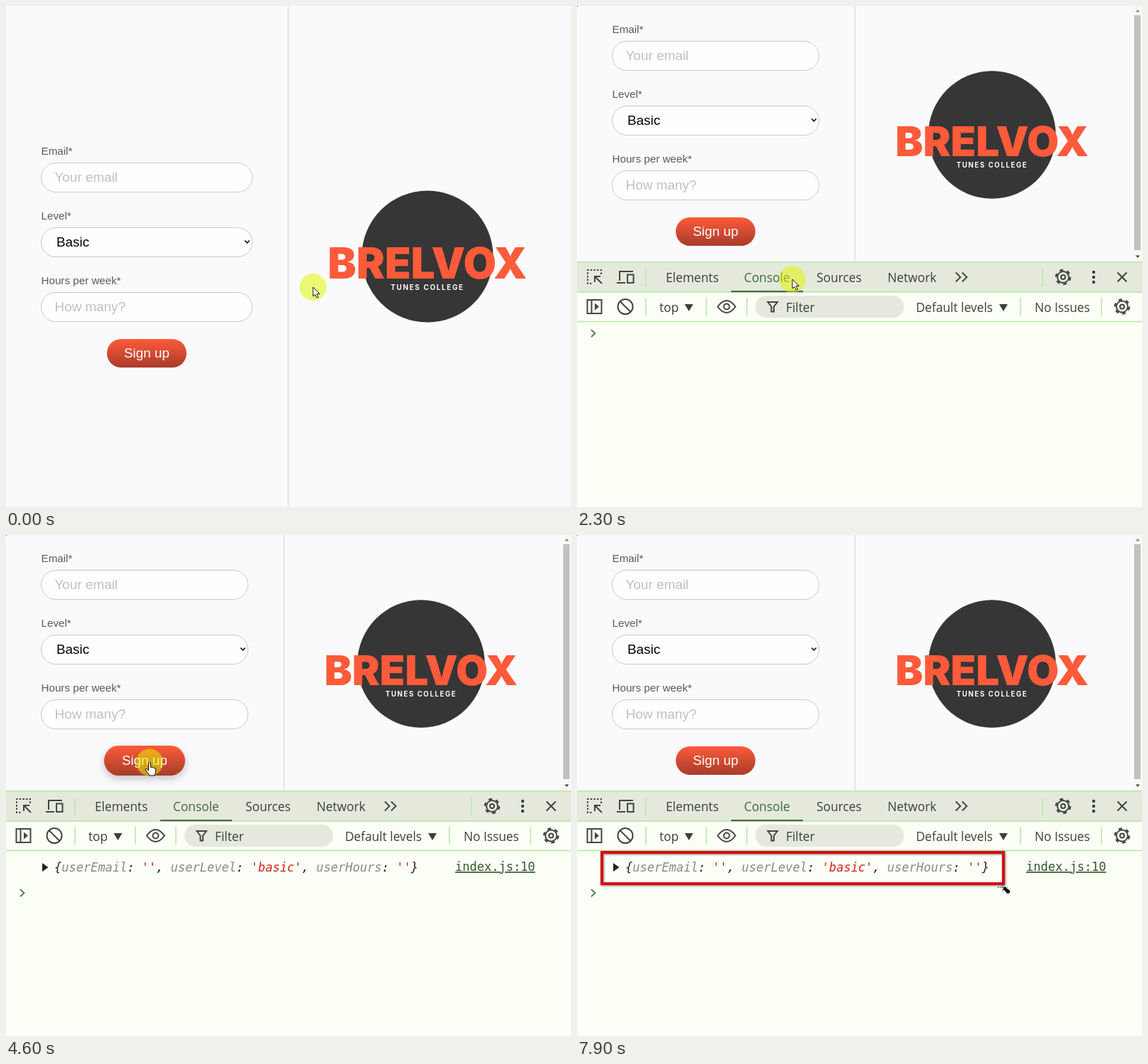
Recreate the animation shown at these times as an HTML page. Size 795 by 704 pixels, loop 8000 ms.

```html
<!DOCTYPE html>
<html lang="en">
<head>
<meta charset="utf-8">
<title>Sign-up form and console</title>
<style>
  html, body { margin: 0; width: 100%; height: 100%; overflow: hidden; background: #fafafc; }
  svg { display: block; }
  text { white-space: pre; }
  .form { font: 18.9px "Liberation Sans", Arial, sans-serif; }
  .label { font-size: 15.2px; fill: #5b5b5e; }
  .hint { fill: #bfbfc3; }
  .field { fill: #fefffd; stroke: #c9c9cb; }
  .brand { font: 900 60px Inter, sans-serif; fill: #ff5a3a; text-anchor: middle; }
  .tagline { font: 700 10px Inter, sans-serif; letter-spacing: 1.6px; fill: #fafafc; text-anchor: middle; }
  .menu { font: 8.8px "Open Sans", "Noto Sans", sans-serif; fill: #1f211e; }
  .menu .box { fill: #fafff5; filter: drop-shadow(0 3px 5px rgba(0, 0, 0, .28)); }
  .end { text-anchor: end; fill: #4c4f4a; }
  .tools { font: 17.3px "Open Sans", "Noto Sans", sans-serif; fill: #3c403b; }
  .icon { fill: none; stroke: #434740; stroke-width: 2; }
  .rule { stroke: #b3e9a5; stroke-width: 1.5; }
  .log { font: italic 17px "DejaVu Sans Mono", monospace; fill: #202220; }
  .key { fill: #878b85; }
  .str { fill: #d5231f; }
  .link { font-style: normal; fill: #35582f; text-decoration: underline; }
</style>
</head>
<body>
<svg id="stage" width="795" height="704" viewBox="0 0 795 704"></svg>
<script>
const LOOP = 8000, STEP = 100, HALO_LAG = 40;
const text = (x, y, s, cls = '', extra = '') => `<text x="${x}" y="${y}" class="${cls}" ${extra}>${s}</text>`;
const rect = (x, y, w, h, extra = '') => `<rect x="${x}" y="${y}" width="${w}" height="${h}" ${extra}/>`;
const path = (d, extra = 'class="icon"') => `<path d="${d}" ${extra}/>`;
const at = (x, y, s) => `<g transform="translate(${x} ${y})">${s}</g>`;
const group = (id, s, cls = '') => `<g id="${id}" class="${cls}">${s}</g>`;

// Sign-up page: shift moves it up, narrow shrinks the left column
function page(id, shift, narrow, logoX, logoY, logoScale) {
  const w = 297 - narrow, mid = 198 - narrow / 2;
  const field = (y, label, value, cls) =>
    text(49.5, y - 11, label, 'label') +
    rect(49.5, y + .5, w, 41, 'rx="20.5" class="field"') +
    text(cls ? 68.5 : 71, y + 26.6, value, cls);
  return group(id, rect(0, 0, 795, 704, 'fill="#fafafc"') +
    `<g transform="translate(0 ${-shift})">` +
    field(220, 'Email*', 'Your email', 'hint') +
    field(311, 'Level*', 'Basic', '') +
    field(402, 'Hours per week*', 'How many?', 'hint') +
    path(`M${336 - narrow} 329.5l3.3 3.3 3.3-3.3`, 'fill="none" stroke="#111" stroke-width="1.7"') +
    `<g class="button">${rect(mid - 56, 468, 112, 40, 'rx="20" fill="url(#red)"')}</g>` +
    text(mid, 494.3, 'Sign up', '', 'fill="#fff" text-anchor="middle"') + '</g>' +
    rect(397 - narrow - .5, 0, 1, 704, 'fill="#d0d0d4"') +
    `<g transform="translate(${logoX} ${logoY}) scale(${logoScale})">` +
    '<circle r="92.5" fill="#363636"/>' +
    text(0, 31, 'BRELVOX', 'brand') + text(0, 47, 'TUNES COLLEGE', 'tagline') + '</g>', 'form');
}

const menuRows = [
  [-3, 'Back', 'Alt+Left Arrow'], [19, 'Forward', 'Alt+Right Arrow'], [41, 'Reload', 'Ctrl+R'],
  [75.5, 'Save as…', 'Ctrl+S'], [97, 'Print…', 'Ctrl+P'], [119, 'Cast…'],
  [142, 'Search with Orbexo Peek'], [165, 'Open in reading mode'],
  [200, 'Send to your devices'], [222.5, 'Create QR Code for this page'], [258, 'Translate to English'],
  [293, 'Lockbarro – Passcode Steward', '>'], [314.5, 'Quillo Pagerat: PDF edit, convert, sign tools', '>'],
  [349.5, 'View page source', 'Ctrl+U'], [371, 'Inspect']
];
const thin = 'fill="none" stroke="#434740" stroke-width="1.3"';
const menu = group('menu',
  rect(420, -60, 311, 451, 'rx="8" class="box"') +
  group('menuHover', rect(420, 361, 311, 21, 'fill="#e5ebdf"')) +
  [57.5, 182, 240, 275, 331.5].map(y => rect(420, y - .5, 311, 1, 'fill="#c6efb8"')).join('') +
  menuRows.map(([y, name, side]) =>
    text(461, y + 3.2, name, '', y < 30 ? 'fill="#777b75"' : '') +
    (side === '>' ? path(`M707 ${y - 3.5}l3.5 3.5-3.5 3.5`, thin) : side ? text(714, y + 3.2, side, 'end') : '')).join('') +
  '<circle cx="444" cy="142" r="5.5" fill="#434740"/>' +
  path('M440 203v-7h9M438 204h6M446 198.5h3.5v5.5h-3.5z', thin) +
  [438.5, 445.5].map(x => [217, 224].map(y => rect(x, y, 4, 4, thin)).join('')).join('') +
  '<circle cx="444" cy="292.5" r="6" fill="#1a73c8"/>' + rect(438, 308, 12, 12, 'rx="1.5" fill="#b30b00"'), 'menu');

const more = x => path(`M${x - 8} 374.5l6.5 6.5-6.5 6.5M${x + 1} 374.5l6.5 6.5-6.5 6.5`);
const bar = (x, y) => path(`M${x} ${y}v25`, 'class="rule"');
const down = x => path(`M${x - 6} 419h12l-6 10z`, 'fill="#3c403b"');
const gear = (x, y) => at(x, y, '<g class="icon"><circle r="8"/><circle r="3"/>' +
  '<circle r="10" stroke-width="2.6" stroke-dasharray="5 5.47"/></g>');

const tabs = [['Elements', 107, 216], ['Console', 217, 318], ['Sources', 319, 418], ['Network', 419, 526]];
const scrollbar = rect(783, 0, 12, 359, 'fill="#f8f8f9"') + rect(784, 13, 9, 330, 'fill="#c1c1c1"') +
  path('M786 8.5h6l-3-3.5z', 'fill="#8a8a8a"') + path('M786 350.5h6l-3 3.5z', 'fill="#444"');

const sideIcons = group('sideIcons',
  path('M34 377v-6h-19v19h7', 'class="icon" stroke-dasharray="2.5 2.2"') +
  path('M25 388v-8h8M25.5 380.5l9.5 9.5') +
  path('M60 386v-13h19M56 389h12M71 377.5h8.5v11.5h-8.5z') +
  bar(97, 369) + bar(655, 369) + more(541) + gear(684, 381) +
  [374, 381, 388].map(y => `<circle cx="727" cy="${y}" r="2.2"/>`).join('') +
  path('M760.5 374.5l13 13M773.5 374.5l-13 13'));

const logLine = group('logLine', path('M51 461v12l8.5-6z', 'fill="#202220"') +
  text(68, 473, '{' + [['userEmail', ''], ['userLevel', 'basic'], ['userHours', '']].map(([k, v]) =>
    `<tspan class="key">${k}</tspan>: <tspan class="str">'${v}'</tspan>`).join(', ') + '}', 'log') +
  text(632, 472, 'index.js:10', 'log link'));

const consolePane = group('console',
  path('M14.5 413h20v19h-20zM20.5 413v19') + path('M25 417.5l6 5-6 5z', 'fill="#434740"') +
  '<circle cx="68" cy="422.5" r="10.5" class="icon"/>' + path('M60.5 415l15 15') +
  path('M198 422.5q12.5-17 25 0q-12.5 17-25 0z') + '<circle cx="210.5" cy="422.5" r="4" class="icon"/>' +
  [97, 182, 239, 624, 738].map(x => bar(x, 410)).join('') +
  rect(251, 407, 209, 31, 'rx="15.5" fill="#e4e9dc"') + path('M268.5 416h13.5l-5 6.5v7h-3.5v-7z') +
  text(116, 429.5, 'top') + down(157.5) + text(294, 429.5, 'Filter') +
  text(477, 429.5, 'Default levels') + down(600) + text(644, 429.5, 'No Issues') + gear(767, 422.5) +
  path('M0 443.5h795', 'class="rule"') + logLine +
  group('prompt', path('M20 455l5.5 5-5.5 5', 'fill="none" stroke="#4d7d45" stroke-width="1.8"')));

const devtools = group('devtools', scrollbar +
  rect(0, 359, 795, 345, 'fill="#fbfff5"') + rect(0, 360, 795, 42, 'fill="#e4e9dc"') +
  group('tabHover', rect(0, 361, 107, 40, 'fill="#d9dfd3"')) +
  path('M0 359.7h795M0 402h795', 'class="rule"') +
  tabs.map(([name, x]) => text(x + 18, 388, name, 'tab')).join('') +
  group('underline', rect(0, 400, 1, 2.2, 'fill="#4a6b45"')) +
  group('loading', text(544, 388, 'Performance') + more(680)) + sideIcons + consolePane, 'tools');

const cursors =
  '<circle id="halo" r="19" fill="rgba(226,246,0,.53)"/>' +
  group('frame', '<rect id="marker" x="35" y="446" fill="none" stroke="#dd0b12" stroke-width="4" ' +
    'style="filter:drop-shadow(1px 1px 1.5px rgba(0,0,0,.5))"/>') +
  group('arrow', path('M0 0v13l3-2.7 2.2 4.8 2.3-1-2.2-4.7h4z', 'fill="#fff" stroke="#111"')) +
  group('hand', path('M-1.5 1q1.5-2 3 0v6q1.5-1 2.7.5 1.500-.8 2.5.7 1.800-.4 2 1.3v4q0 2-1.5 3.5v1.5h-8v-1.5l-5-6.5q-.3-2 1.800-1.3l2.5 2.3z',
    'fill="#fff" stroke="#111"')) +
  group('cross', path('M-7 0h14M0-7v14', 'stroke="#222" stroke-dasharray="2 1.3"') +
    path('M3 2l4 3.5', 'stroke="#111" stroke-width="4.5" stroke-linecap="round"') +
    '<circle cx="7.5" cy="6" r="2.8" fill="#111"/>');

document.getElementById('stage').innerHTML =
  '<defs><linearGradient id="red" x2="0" y2="1"><stop stop-color="#fd5a39"/><stop offset="1" stop-color="#a83c2a"/></linearGradient></defs>' +
  page('fullPage', 0, 0, 593, 352, 1) + page('dockedPage', 171, 6, 584, 181, .97) +
  menu + devtools + group('corner', rect(0, 0, 1, 1, 'fill="#333"')) + cursors;

const el = id => document.getElementById(id);
const show = (id, on) => { el(id).style.display = on ? '' : 'none'; };
const move = (id, x, y) => el(id).setAttribute('transform', `translate(${x} ${y})`);

// Pointer moves: start, end, and where it comes to rest
const home = [432, 395];
const moves = [
  [0, 350, 420, 391],       // right click
  [800, 1075, 474, 367],    // to Inspect
  [1100, 1800, 474.5, 372.5],
  [2000, 2250, 303, 384],   // to Console
  [2400, 2790, 318, 314],
  [2790, 3150, 202, 319.5], // to the button
  [4600, 5150, 33, 457],
  [5200, 5400, 44, 447],
  [5450, 5850, 34, 445],
  [6130, 6850, 600, 494],   // drag the marker
  [7200, 7800, 599, 495]
];
function pointer(t) {
  let [x, y] = home;
  for (const [start, end, endX, endY] of moves) {
    const u = Math.min(1, Math.max(0, (t - start) / (end - start)));
    const p = u * u * (3 - 2 * u);
    x += (endX - x) * p;
    y += (endY - y) * p;
  }
  return [x, y];
}

const hoverButton = document.querySelector('#dockedPage .button');
const tabTexts = document.querySelectorAll('.tab');

function draw(t) {
  const [x, y] = pointer(t), [haloX, haloY] = pointer(t - HALO_LAG);
  const docked = t >= 1700, loaded = t >= 2000, inConsole = t >= 2300, snipping = t >= 5500;
  const onButton = docked && !snipping && x > 139 && x < 251 && y > 297 && y < 337;

  show('corner', t >= 100);
  show('fullPage', !docked);
  show('dockedPage', docked);
  show('menu', t >= 500 && !docked);
  show('menuHover', y < 382);
  show('devtools', docked);
  show('loading', !loaded);
  show('sideIcons', loaded);
  show('console', inConsole);
  show('logLine', t >= 3400);
  move('prompt', 0, t >= 3500 ? 43 : 0);

  const active = inConsole ? 1 : 0, [, left, right] = tabs[active];
  tabTexts.forEach((tab, i) => { tab.style.fill = i === active ? '#42693b' : ''; });
  el('underline').setAttribute('transform', `translate(${left} 0) scale(${right - left} 1)`);
  const over = tabs.findIndex(([, a, b], i) => i !== active && x >= a && x <= b && y > 360 && y < 402);
  show('tabHover', over >= 0 && !snipping);
  if (over >= 0) move('tabHover', tabs[over][1], 0);

  hoverButton.style.cssText = onButton
    ? 'transform-origin:195px 488px;transform:scale(1.018,1.05);filter:drop-shadow(0 4px 5px rgba(0,0,0,.22))' : '';

  show('halo', !snipping);
  show('arrow', !snipping && !onButton);
  show('hand', onButton);
  show('cross', snipping);
  move('halo', haloX, haloY);
  ['arrow', 'hand', 'cross'].forEach(id => move(id, x, y));

  show('frame', t >= 6200);
  el('marker').setAttribute('width', Math.max(1, x - 34));
  el('marker').setAttribute('height', Math.max(1, y - 451));
}

const start = performance.now();
function tick() {
  draw(Math.floor((performance.now() - start) % LOOP / STEP) * STEP);
  requestAnimationFrame(tick);
}
tick();
</script>
</body>
</html>
```
